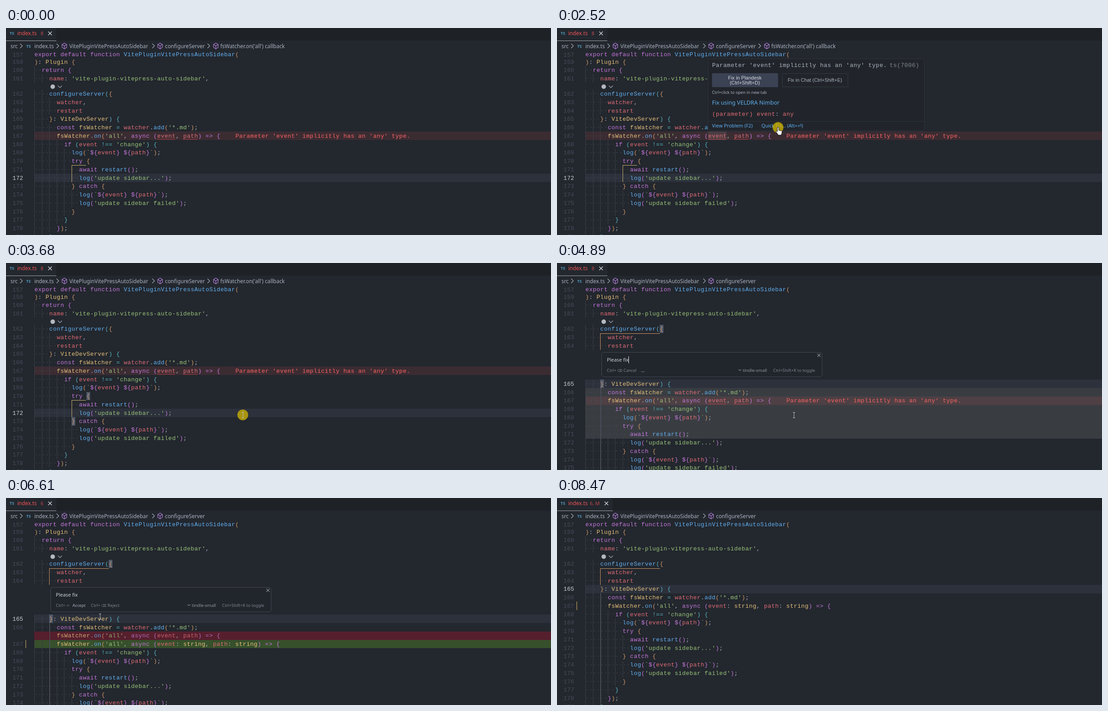
An HTML page with a canvas for the animation above (9.63 s loop, 1213x462 px).

```html
<!DOCTYPE html>
<html lang="en">
<head>
<meta charset="utf-8">
<title>Editor quick fix</title>
<style>
html, body { margin: 0; width: 100%; height: 100%; overflow: hidden; background: #23272e; }
canvas { display: block; width: 1213px; height: 462px; }
</style>
</head>
<body>
<canvas id="stage"></canvas>
<script>
const W = 1213, H = 462, LOOP = 9630;
const LEFT = 63, CW = 8.28, ROW = 18.75, ZONE = 66.5;
const canvas = document.getElementById('stage');
const ctx = canvas.getContext('2d');
const dpr = window.devicePixelRatio || 1;
canvas.width = W * dpr;
canvas.height = H * dpr;

const C = {
  bg: '#23272e', bar: '#1e2227', text: '#abb2bf', red: '#e06c75', purple: '#c678dd',
  blue: '#61afef', green: '#98c379', yellow: '#e5c07b', cyan: '#56b6c2', orange: '#d19a66',
  guide: '#3b4048', number: '#454c59', error: '#f96363', dim: '#7f8590', beam: '#bcbfc4'
};
const MONO = '13px "Liberation Mono", monospace';
const SPACING = CW - 7.8;
const ui = (size, weight = 400) => `${weight} ${size}px "Noto Sans", "DejaVu Sans", sans-serif`;
const sans = size => `${size}px "Liberation Sans", sans-serif`;

const ERROR = "Parameter 'event' implicitly has an 'any' type.";
const ASSIST = 'Fix using VELDRA Nimbor';

// ---- code model ----
const source = `export default function VitePluginVitePressAutoSidebar(
): Plugin {
  return {
    name: 'vite-plugin-vitepress-auto-sidebar',
    configureServer({
      watcher,
      restart
    }: ViteDevServer) {
      const fsWatcher = watcher.add('*.md');
      fsWatcher.on('all', async (event, path) => {
        if (event !== 'change') {
          log(\`\${event} \${path}\`);
          try {
            await restart();
            log('update sidebar...');
          } catch {
            log(\`\${event} \${path}\`);
            log('update sidebar failed');
          }
        }
      });
    },`.split('\n');

const KEYWORDS = /^(export|default|function|return|const|async|if|try|await|catch|=>)$/;
const TYPES = /^(Plugin|ViteDevServer|string|fsWatcher)$/;
const PAIRS = [C.orange, C.purple, C.cyan];

function lex(line, depth) {
  const parts = [];
  const re = /'[^']*'|\$\{\w+\}|`|\w+|=>|!==|=|[(){}]|[^\s]/g;
  for (let m; (m = re.exec(line));) {
    const s = m[0], col = m.index;
    const add = (text, color, at = col) => parts.push({ text, color, col: at });
    if (s.startsWith('${')) {
      add('${', C.purple);
      add(s.slice(2, -1), C.red, col + 2);
      add('}', C.purple, col + s.length - 1);
    }
    else if (/^['`]/.test(s)) add(s, C.green);
    else if (KEYWORDS.test(s)) add(s, C.purple);
    else if (TYPES.test(s)) add(s, C.yellow);
    else if (/^\w/.test(s)) add(s, line[col + s.length] === '(' ? C.blue : C.red);
    else if (/^[({]$/.test(s)) add(s, PAIRS[depth++ % 3]);
    else if (/^[)}]$/.test(s)) add(s, PAIRS[--depth % 3]);
    else if (/=/.test(s)) add(s, C.cyan);
    else add(s, C.text);
  }
  return { parts, depth, indent: line.search(/\S/), length: line.length };
}

let depth = 0;
const lines = source.map((line, i) => {
  const out = lex(line, depth);
  depth = out.depth;
  out.n = i ? 158 + i : 157;
  return out;
});
const oldLine = lines.find(l => l.n === 167);
const newLine = lex("      fsWatcher.on('all', async (event: string, path: string) => {", 3);

// ---- drawing helpers ----
function txt(s, x, y, color, font = ui(11.8), align = 'left') {
  ctx.font = font;
  ctx.fillStyle = color;
  ctx.textAlign = align;
  ctx.fillText(s, x, y + 4);
}
function code(s, x, y, color) {
  ctx.letterSpacing = SPACING.toFixed(2) + 'px';
  txt(s, x + SPACING / 2, y, color, MONO);
  ctx.letterSpacing = '0px';
}
function rect(x, y, w, h, color) {
  ctx.fillStyle = color;
  ctx.fillRect(x, y, w, h);
}
// One text row around y, snapped to whole pixels.
function rowRect(x, y, w, color) {
  const top = Math.round(y - ROW / 2);
  rect(x, top, w, Math.round(y + ROW / 2) - top, color);
}
function box(x, y, w, h, r, fill, stroke) {
  ctx.beginPath();
  ctx.roundRect(x, y, w, h, r);
  if (fill) { ctx.fillStyle = fill; ctx.fill(); }
  if (stroke) { ctx.strokeStyle = stroke; ctx.lineWidth = 1; ctx.stroke(); }
}
function poly(points, color, width = 1) {
  ctx.beginPath();
  points.forEach(([x, y]) => ctx.lineTo(x, y));
  ctx.strokeStyle = color;
  ctx.lineWidth = width;
  ctx.stroke();
}
function disc(x, y, r, color) {
  ctx.beginPath();
  ctx.arc(x, y, r, 0, 7);
  ctx.fillStyle = color;
  ctx.fill();
}
function cross(x, y, r, color) {
  poly([[x - r, y - r], [x + r, y + r]], color, 1.1);
  poly([[x + r, y - r], [x - r, y + r]], color, 1.1);
}
const chevron = (x, y) => poly([[x - 2.5, y - 5], [x + 2.5, y], [x - 2.5, y + 5]], C.text, 1.1);
const chevronDown = (x, y, r, color) => poly([[x - r, y - r / 2], [x, y + r / 2], [x + r, y - r / 2]], color, 1.1);
function cube(x, y) {
  const at = k => [x + 6 * Math.cos(Math.PI * (k / 3 - .5)), y + 6.5 * Math.sin(Math.PI * (k / 3 - .5))];
  poly([0, 1, 2, 3, 4, 5, 0].map(at), '#b180d7', 1.2);
  [1, 3, 5].forEach(k => poly([[x, y], at(k)], '#b180d7', 1.2));
}
function squiggle(x, y, w) {
  const points = [];
  for (let i = 0; i <= w; i += 2) points.push([x + i, y + (i % 4 ? 1 : -1)]);
  poly(points, '#d9474b', .9);
}
function star(x, y, r) {
  const points = [];
  for (let i = 0; i <= 8; i++) {
    const k = i % 2 ? r * .35 : r, a = i * Math.PI / 4;
    points.push([x + k * Math.sin(a), y - k * Math.cos(a)]);
  }
  poly(points, '#c5cad3', 1);
}

// ---- timeline ----
const path = [
  [710, 541, 450], [1260, 360, 243], [1950, 360, 243], [2480, 492, 222], [2870, 492, 222],
  [3080, 522, 321], [3280, 527, 339], [6050, 527, 339], [6850, 121, 243], [6970, 131, 241],
  [7770, 131, 241], [8470, 1025, 455]
];
function mouseAt(t) {
  const q = Math.max(710, Math.floor((t - 10) / 50) * 50 + 10);
  const i = Math.max(1, path.findIndex(p => p[0] > q));
  const [t0, x0, y0] = path[i - 1], [t1, x1, y1] = path[i];
  const u = (q - t0) / (t1 - t0), e = u * u * (3 - 2 * u);
  return [x0 + (x1 - x0) * e, y0 + (y1 - y0) * e];
}
// Last value whose start time has passed.
const pick = (t, steps) => steps.reduce((v, [at, next]) => t >= at ? next : v, 0);
const within = (t, a, b) => t >= a && t < b;

// ---- parts ----
function drawHeader(t, inserted) {
  const badge = t < 5850 ? '8' : t < 8020 ? '6' : '6, M';
  const wide = badge.length > 1, tabWidth = wide ? 124 : 112;
  rect(0, 0, W, 28, C.bar);
  rect(0, 0, tabWidth, 28, C.bg);
  rect(0, 28, tabWidth, 1, '#a4a8ae');
  txt('TS', 8, 11, '#519aba', ui(9, 700));
  txt('index.ts', 25, 12, '#ee5555');
  txt(badge, wide ? 73 : 77, 12, '#c24a4a', ui(11));
  cross(wide ? 110 : 98, 12, 4, '#e6e8eb');

  txt('src', 10, 41, C.text);
  chevron(34, 40);
  txt('TS', 45, 40, '#519aba', ui(9, 700));
  txt('index.ts', 63, 41, C.text);
  chevron(115, 40);
  cube(130, 40);
  txt('VitePluginVitePressAutoSidebar', 141, 41, C.text);
  chevron(328, 40);
  cube(343, 40);
  txt('configureServer', 354, 41, C.text);
  if (inserted) return;
  chevron(451, 40);
  cube(467, 40);
  txt("fsWatcher.on('all') callback", 477, 41, C.text);
}

function drawLine(line, y, bare) {
  if (!bare) {
    for (let i = 0; i < line.indent; i++) {
      const x = LEFT + i * CW;
      if (i % 2 === 0) rowRect(Math.round(x), y, 1, C.guide);
      rect(x + CW / 2 - .75, y - .75, 1.5, 1.5, '#4a505b');
    }
  }
  line.parts.forEach(p => code(p.text, LEFT + p.col * CW, y, p.color));
}

const brace = (col, y) => rowRect(LEFT + col * CW, y, CW, '#515a6b');

function drawCode(t) {
  const inserted = t >= 3690, open = inserted && t < 7420;
  const diff = within(t, 5240, 7420), edited = t >= 5240;
  const yOf = n => n === 157 ? 59 : n < 162 ? 75.5 + (n - 159) * 18.5
    : 147 + (n - 162) * ROW + (open && n > 164 ? ZONE : 0) + (diff && n > 166 ? ROW : 0);
  const band = (n, color) => rowRect(LEFT, yOf(n), W, color);
  const current = inserted ? 165 : 172;

  band(current, '#2c313c');
  const from = pick(t, [[3790, 166], [5040, 167], [5240, 168], [5600, 169], [5650, 170], [5700, 171], [5850, 0]]);
  if (from) for (let n = from; n <= 171; n++) band(n, 'rgba(255,255,240,.1)');
  if (!edited) band(167, 'rgba(228,84,84,.12)');
  if (diff) {
    band(167, '#37502c');
    rowRect(LEFT, yOf(167) - ROW, W, '#561f2d');
    ctx.globalAlpha = .85;
    drawLine(oldLine, yOf(167) - ROW, true);
    ctx.globalAlpha = 1;
  }
  if (t >= 5600) rowRect(43, yOf(167), 2, '#80724a');

  if (within(t, 1610, 3640)) {
    const glow = t < 2570 ? .08 : .19;
    rowRect(LEFT + 33 * CW, yOf(167), 5 * CW, `rgba(255,255,255,${glow})`);
  }
  if (within(t, 2570, 3690)) {
    brace(14, yOf(170));
    brace(10, yOf(173));
  }
  if (within(t, 3690, 8470)) {
    brace(20, yOf(162));
    brace(4, yOf(165));
  }

  for (const line of lines) {
    const y = yOf(line.n);
    drawLine(edited && line.n === 167 ? newLine : line, y);
    txt(line.n, 38, y + (line.n === 157 ? 1 : 0), line.n === current ? '#c8ccd4' : C.number, MONO, 'right');
  }

  if (inserted) {
    const top = yOf(162) + 10;
    rect(97, yOf(166) - ROW / 2, 1, H, '#515863');
    poly([[229, top + .5], [96.5, top + .5], [96.5, yOf(164) + ROW / 2]], C.orange);
  } else {
    poly([[178, 306.5], [146.5, 306.5], [146.5, 344]], '#cdb272');
  }

  const y = yOf(167);
  if (t < 5850) code(ERROR, LEFT + (edited ? newLine : oldLine).length * CW + 33.5, y, C.error);
  if (!edited) {
    squiggle(LEFT + 33 * CW, y + 7.5, 5 * CW);
    squiggle(LEFT + 40 * CW, y + 7.5, 4 * CW);
  }

  disc(104, 131, 5, '#b4b8bf');
  chevronDown(120, 131, 4.5, C.text);
}

function drawHover(t) {
  ctx.globalAlpha = pick(t, [[1610, .32], [1660, .7], [1700, 1]]);
  box(336.5, 68.5, 481, 161, 4, '#21252b', '#2f343d');
  code(ERROR, 345, 83, C.text);
  code('ts(7006)', 740, 83, C.dim);
  box(345, 101, 147, 31, 2, '#3b4254');
  txt('Fix in Plandesk', 418, 111, '#d7dae0', sans(11), 'center');
  txt('(Ctrl+Shift+D)', 418, 122, '#d7dae0', sans(11), 'center');
  box(501.5, 101.5, 146, 30, 2, null, '#343a45');
  txt('Fix in Chat (Ctrl+Shift+E)', 574, 116, C.text, sans(10.9), 'center');
  txt('Ctrl+click to open in new tab', 345, 143, C.text, ui(9.2));
  txt(ASSIST, 345, 167, C.blue, ui(12.6));
  code('(parameter) event', 345, 192, C.red);
  code(':', 345 + 17 * CW, 192, C.text);
  code('any', 345 + 19 * CW, 192, C.red);
  rect(337, 208, 480, 1, '#2f343d');
  txt('View Problem (F2)', 345, 218, C.blue, ui(10.8));
  txt('Quick Fix... (Alt+⏎)', 455, 218, C.blue, ui(10.8));
  ctx.globalAlpha = 1;
}

function drawMenu(mouseY) {
  ctx.save();
  ctx.shadowColor = 'rgba(0,0,0,.4)';
  ctx.shadowBlur = 8;
  box(455.5, 229.5, 240, 128, 5, '#1f2329');
  ctx.restore();
  box(455.5, 229.5, 240, 128, 5, null, '#3a3f49');
  txt('Quick Fix', 469, 246, C.text, ui(10.8, 500));
  const items = ['Infer parameter types from usage', 'Infer all types from usage', ASSIST, 'Fix with AI'];
  const hot = Math.floor((mouseY - 260) / 23.7);
  items.forEach((item, i) => {
    const y = 272 + i * 23.7;
    if (i === hot) box(459, y - 12, 232, 24, 3, '#2c313a');
    txt(item, 492, y, '#d3d6dc');
    if (i < 3) {
      disc(477, y - 2.5, 4.8, '#ffcc00');
      rect(474.5, y + 1, 5, 3, '#ffcc00');
      rect(475, y + 4.6, 4, 1.4, '#ffcc00');
    } else {
      star(475, y - 1.5, 5);
      star(481, y + 3.5, 3);
    }
  });
}

function drawWidget(t) {
  box(99.5, 199.5, 490.5, 54.5, 5, '#21252c', '#444a55');
  cross(583, 206, 3.5, '#8d939e');
  if (t >= 3740) txt('Please fix', 111, 216, '#ccd0d7', ui(11));
  if (t < 5600 && Math.floor((t - 3690) / 525) % 2 === 0) rect(159, 208, 1, 16, '#e4e6ea');
  const small = ui(9.3);
  const action = (x, key, label, color) => {
    txt('Ctrl+', x, 239, C.dim, small);
    txt(key, x + 23, 239, C.dim, ui(8));
    txt(label, x + 37, 239, color, small);
  };
  if (t < 5850) action(111, '⌫', 'Cancel', C.dim);
  else {
    action(111, '⏎', 'Accept', C.text);
    action(189, '⌫', 'Reject', C.dim);
  }
  const dots = pick(t, [[3880, 1], [4030, 2], [4190, 3], [4390, 1], [4740, 2], [4890, 3], [5240, 1], [5400, 2], [5600, 0]]);
  for (let i = 0; i < dots; i++) rect(187.5 + i * 3, 242, 1.3, 1.3, C.text);
  chevronDown(407, 239, 3, C.dim);
  txt('tindle-small', 413.5, 239, '#9499a3', ui(9.8));
  txt('Ctrl+Shift+K to toggle', 481, 239, C.dim, small);
}

const handShape = new Path2D('M-1.5 0q1.5-1.5 3 0V6l6 1.5q1.5.5 1.5 2l-1 5q-.5 2-2 2.5H1q-1.5-1-3-4l-3-4q1.2-2 3.5 0Z');

function drawMouse(t, [x, y]) {
  if (!within(t, 710, 8470)) return;
  if ([[2500, 2600], [3590, 3690], [7420, 7520]].some(([a, b]) => within(t, a, b)))
    disc(x, y, 12, 'rgba(205,178,0,.78)');
  if (within(t, 2320, 3640) || within(t, 7020, 7420)) {
    ctx.save();
    ctx.translate(x, y);
    ctx.fillStyle = '#fff';
    ctx.strokeStyle = '#111';
    ctx.lineWidth = 1;
    ctx.fill(handShape);
    ctx.stroke(handShape);
    ctx.restore();
    return;
  }
  const X = Math.round(x), Y = Math.round(y);
  rect(X, Y - 6, 1, 13, C.beam);
  rect(X - 2, Y - 6, 5, 1, C.beam);
  rect(X - 2, Y + 6, 5, 1, C.beam);
}

function draw(t) {
  const mouse = mouseAt(t);
  ctx.setTransform(dpr, 0, 0, dpr, 0, 0);
  rect(0, 0, W, H, C.bg);
  drawCode(t);
  drawHeader(t, t >= 3690);
  if (within(t, 1610, 2570)) drawHover(t);
  if (within(t, 2620, 3640)) drawMenu(mouse[1]);
  if (within(t, 3690, 7420)) drawWidget(t);
  drawMouse(t, mouse);
}

const start = performance.now();
function frame() {
  draw((performance.now() - start) % LOOP);
  requestAnimationFrame(frame);
}
frame();
</script>
</body>
</html>
```
